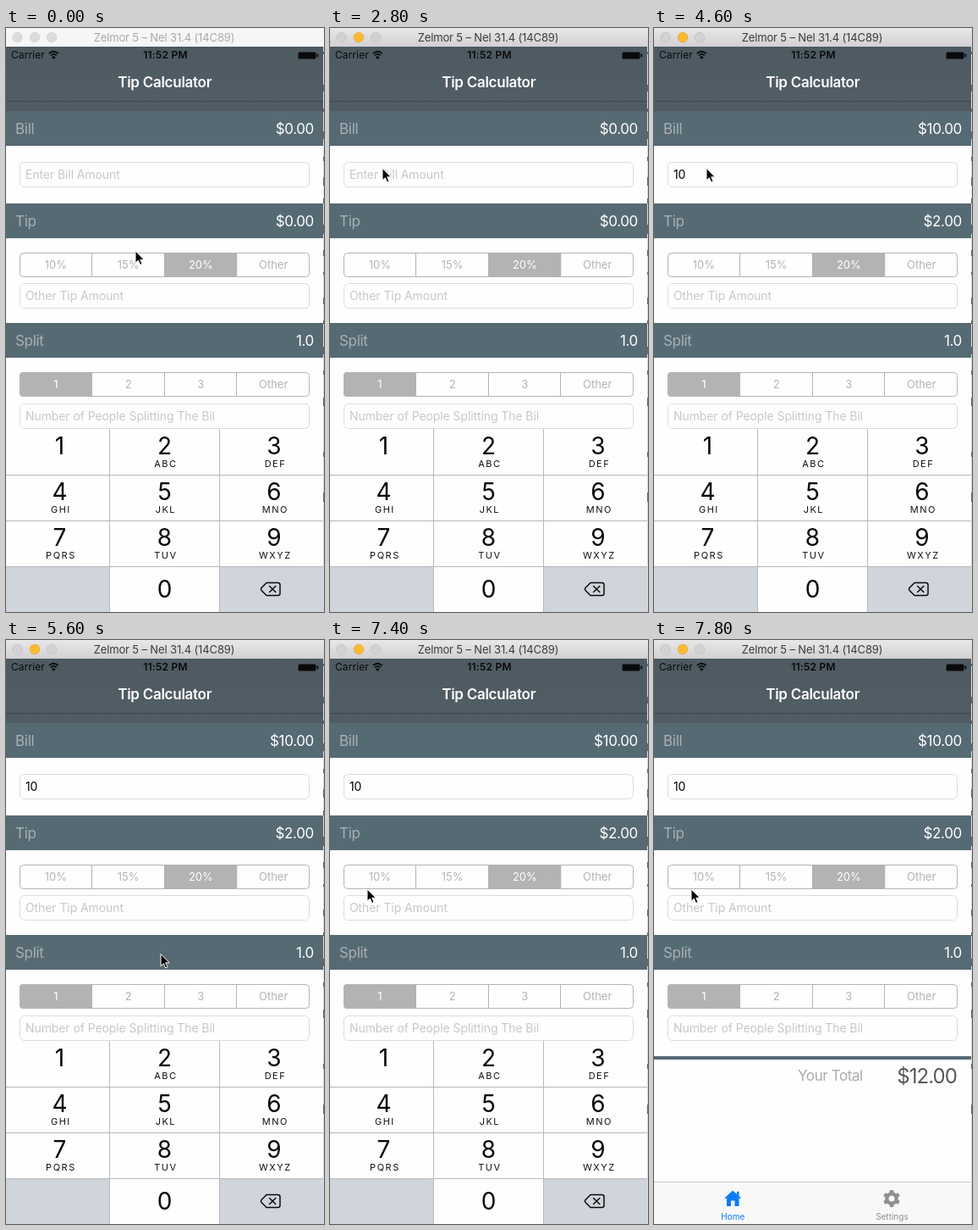
These frames come from a looping animation (376 by 689 pixels, 8000 ms). An HTML page:

```html
<!DOCTYPE html>
<html lang="en">
<head>
<meta charset="utf-8">
<title>Tip Calculator</title>
<style>
html, body { margin: 0; width: 100%; height: 100%; overflow: hidden; background: #fefefe; }
svg { display: block; width: 376px; height: 689px; }
text { font-family: Inter, Roboto, sans-serif; white-space: pre; }
</style>
</head>
<body>
<svg id="stage" viewBox="0 0 376 689" xmlns="http://www.w3.org/2000/svg">
  <defs>
    <linearGradient id="bar" x2="0" y2="1"><stop stop-color="#e9e7e9"/><stop offset="1" stop-color="#d2d0d2"/></linearGradient>
    <linearGradient id="nav" x2="0" y2="1"><stop stop-color="#4d5a62"/><stop offset="1" stop-color="#525e66"/></linearGradient>
  </defs>
  <rect width="376" height="689" fill="#fefefe"/>
  <g id="page"></g>
  <g id="tabs"></g>
  <g id="keys"></g>
  <g id="top"></g>
  <g id="edge"></g>
  <path id="mouse" d="M0 0V14.2L3.3 11.2L5.6 16.5L8 15.4L5.7 10.3H10.2Z" fill="#000" stroke="#fff" stroke-width="1" stroke-linejoin="round"/>
</svg>
<script>
const LOOP = 8000, STEP = 200;
const el = id => document.getElementById(id);
const put = (id, ...parts) => { el(id).innerHTML = parts.join(''); };

const rect = (x, y, w, h, fill, more = '') =>
  `<rect x="${x}" y="${y}" width="${w}" height="${h}" fill="${fill}" ${more}/>`;
const text = (s, x, y, size, fill, ls = 0, more = '') =>
  `<text x="${x}" y="${y}" font-size="${size}" fill="${fill}" letter-spacing="${ls}" ${more}>${s}</text>`;
const path = (d, more) => `<path d="${d}" ${more}/>`;
const MID = 'text-anchor="middle"', END = 'text-anchor="end"';

const header = (name, y, id) =>
  rect(0, y, 375, 41, '#566a74') +
  text(name, 11, y + 27, 17, '#a9b0b4', -0.3) +
  text('', 364, y + 27, 17, '#fff', -0.35, `${END} id="${id}"`);

const field = (hint, y, id = '') =>
  rect(16.5, y + 0.5, 342, 29, '#fefefe', 'rx="5" stroke="#dcdcde"') +
  text(hint, 23, y + 20, 14, '#c7c7cd', -0.09, id && `id="${id}"`);

function segments(labels, y, chosen) {
  const grey = '#b3b3b3', w = 85.75;
  return rect(16.5, y + 0.5, 342, 28, '#fefefe', 'rx="4"') +
    labels.map((s, i) => {
      const x = 16 + i * w;
      return (i === chosen ? rect(x, y, w, 29, grey, `rx="${i ? 0 : 4}"`) : '') +
        (i ? rect(Math.round(x) - 1, y, 1, 29, grey) : '') +
        text(s, x + w / 2, y + 19, 13, i === chosen ? '#fff' : grey, 0, MID);
    }).join('') +
    rect(16.5, y + 0.5, 342, 28, 'none', `rx="4" stroke="${grey}"`);
}

put('page',
  header('Bill', 98, 'bill'), field('Enter Bill Amount', 158, 'entry'),
  rect(23.4, 164, 2.2, 18, '#fefefe', 'id="caret"'),
  header('Tip', 207, 'tip'), segments(['10%', '15%', '20%', 'Other'], 265, 2), field('Other Tip Amount', 301),
  header('Split', 348, 'split'), segments(['1', '2', '3', 'Other'], 406, 0),
  field('Number of People Splitting The Bil', 443),
  rect(0, 491, 375, 4, '#566a74'),
  text('Your Total', 170, 520, 17, '#aaa', -0.4),
  text('$12.00', 358, 523, 24, '#58585a', -0.95, END)
);

const teeth = Array.from({ length: 6 }, (_, i) =>
  rect(278.6, 649, 4.8, 5, '#8e8e93', `rx="1" transform="rotate(${i * 60} 281 659)"`)).join('');
put('tabs',
  rect(0, 639, 375, 50, '#f8f8f8'), rect(0, 639, 375, 1, '#c4c4c6'),
  path('M93 649.5L83 658.8H86V668H91V661.5H95.5V668H100.5V658.8H103.5L100.5 656V650.8H98V653.7Z', 'fill="#0c7df5"'),
  text('Home', 93.3, 684, 10, '#0c7df5', 0, MID),
  teeth, '<circle cx="281" cy="659" r="5.6" fill="none" stroke="#8e8e93" stroke-width="4.2"/>',
  text('Settings', 281.4, 684, 10, '#8e8e93', 0, MID)
);

const letters = ['', 'ABC', 'DEF', 'GHI', 'JKL', 'MNO', 'PQRS', 'TUV', 'WXYZ'];
const cols = [63.5, 187.5, 317];
const digit = (n, x, y) => text(n, x, y, 28, '#080808', 0, MID);
put('keys',
  rect(0, 473, 375, 216, '#fefefe'),
  rect(0, 635, 122, 54, '#d0d4db'), rect(253, 635, 122, 54, '#d0d4db'),
  ...letters.map((s, i) => {
    const x = cols[i % 3], y = 503 + 54 * Math.floor(i / 3);
    return digit(i + 1, x, y) + text(s, x + 1.4, y + 15, 11, '#111', 1.5, MID);
  }),
  digit(0, 187.5, 672),
  ...[527, 581, 635].map(y => rect(0, y, 375, 1, '#b5b8bf')),
  ...[122, 252].map(x => rect(x, 473, 1, 216, '#b5b8bf')),
  path('M308 654.5H321.5Q324 654.5 324 657V667Q324 669.5 321.5 669.5H308L301.8 663.2Q301 662 301.8 660.8ZM311.6 658.5L318.8 665.5M318.8 658.5L311.6 665.5',
    'fill="none" stroke="#0a0a0a" stroke-width="1.5" stroke-linejoin="round" stroke-linecap="round"')
);

put('top',
  rect(0, 0, 376, 22, '#f6f6f6', 'id="chrome"'),
  ...[13.5, 34, 54].map((x, i) => `<circle id="dot${i}" cx="${x}" cy="11" r="5.8" stroke-width=".6"/>`),
  text('Zelmor 5 – Nel 31.4 (14C89)', 187, 16, 13, '#aaa', -0.13, `${MID} id="title"`),
  rect(0, 22, 375, 76, 'url(#nav)'), rect(0, 86, 375, 1, '#3c474e'), rect(0, 87, 375, 11, '#4f5c64'),
  text('Carrier', 6, 36.3, 12, '#0a0a0a', 0.1),
  path('M50.8 30.2Q56.3 25.3 61.8 30.2M52.8 32.4Q56.3 29.3 59.8 32.4', 'fill="none" stroke="#0a0a0a" stroke-width="1.7"'),
  path('M56.3 37L53.9 34.3Q56.3 32.4 58.7 34.3Z', 'fill="#0a0a0a"'),
  text('11:52 PM', 188.5, 36.3, 12, '#0a0a0a', 0.25, `${MID} font-weight="600"`),
  rect(345.5, 28.5, 21, 8, '#0a0a0a', 'rx="1.5"'), rect(367.5, 30.5, 1.8, 4, '#0a0a0a', 'rx=".8"'),
  text('Tip Calculator', 187.7, 70, 17, '#fff', -0.27, `${MID} font-weight="600"`)
);

// Sliver of the desktop along the right side
put('edge', rect(375, 22, 1, 667, '#dcdcdc'),
  ...[28, 67, 95, 122, 152, 176, 201, 232, 262, 288, 318, 345, 376, 404, 436, 500, 548]
    .map((y, i) => rect(375, y, 1, 3 + i * 5 % 9, '#666')));

const stops = [
  [0, 153, 263], [800, 153, 263], [1400, 135, 278], [1800, 135, 278], [2600, 62, 165.5],
  [4800, 62, 165.5], [5600, 183, 370.5], [6200, 183, 370.5], [7000, 44, 294], [LOOP, 44, 294]
];
const smooth = p => p * p * (3 - 2 * p);
const part = (t, a, b) => smooth(Math.min(1, Math.max(0, (t - a) / (b - a))));

function mouseAt(t) {
  const i = stops.findIndex(s => s[0] > t);
  const [a, x, y] = stops[i - 1], [b, u, v] = stops[i];
  const p = part(t, a, b);
  return [x + (u - x) * p, y + (v - y) * p];
}

const set = (id, attrs) => { for (const k in attrs) el(id).setAttribute(k, attrs[k]); };
const say = (id, s) => { el(id).textContent = s; };
const money = n => '$' + n.toFixed(2);

function draw(t) {
  const entry = t < 4400 ? '' : t < 4600 ? '1' : '10';
  const bill = +entry;
  say('entry', entry || 'Enter Bill Amount');
  set('entry', { fill: entry ? '#000' : '#c7c7cd' });
  say('bill', money(bill));
  say('tip', money(bill * 0.2));
  say('split', '1.0');
  const blink = (t + 850) % 1000 < 500;
  set('caret', { opacity: !entry && blink ? 1 : 0 });

  const active = t >= 2800;
  set('chrome', { fill: active ? 'url(#bar)' : '#f6f6f6' });
  set('title', { fill: active ? '#3c3c3c' : '#a9a9a9' });
  for (let i = 0; i < 3; i++) {
    const lit = active && i === 1;
    set('dot' + i, { fill: lit ? '#fdb92f' : active ? '#d3d1d3' : '#dcdcdc', stroke: lit ? '#dfa023' : active ? '#bcbabc' : '#cdcdcd' });
  }

  set('keys', { transform: `translate(0 ${216 * part(t, 7480, 7740)})` });
  set('mouse', { transform: `translate(${mouseAt(t)})` });
}

function tick() {
  draw(Math.floor(performance.now() % LOOP / STEP) * STEP);
  requestAnimationFrame(tick);
}
tick();
</script>
</body>
</html>
```
